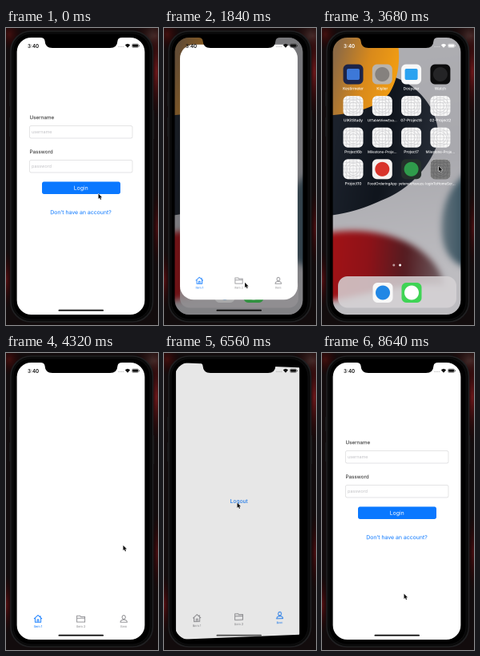
These frames come from a looping animation (190x372 px, 8720 ms). An HTML page with a canvas:

```html
<!DOCTYPE html>
<html lang="en">
<head>
<meta charset="utf-8">
<title>Login flow</title>
<style>
html, body { margin: 0; width: 100%; height: 100%; overflow: hidden; background: #000; }
canvas { display: block; width: 100vw; height: 100vh; }
</style>
</head>
<body>
<canvas id="stage"></canvas>
<script>
const W = 190, H = 372, LOOP = 8720;
const SCR = { x: 13.6, y: 12, w: 159.8, h: 347, r: 18 };
const CX = SCR.x + SCR.w / 2, CY = SCR.y + SCR.h / 2;
const ICON = { x: 135.5, y: 164.5, w: 25, h: 25, r: 6 };
const BLUE = '#0a78ff', FONT = 'Inter, Roboto, sans-serif';
const canvas = document.getElementById('stage');
const g = canvas.getContext('2d');
let pages, sx, sy;

const clamp = v => Math.max(0, Math.min(1, v));
const span = (t, a, b) => clamp((t - a) / (b - a));
const ease = p => p * p * (3 - 2 * p);
const easeOut = p => 1 - (1 - p) ** 3;
const mix = (a, b, p) => a + (b - a) * p;

function box(c, x, y, w, h, r, fill, stroke) {
  c.beginPath();
  c.roundRect(x, y, w, h, r);
  if (fill) { c.fillStyle = fill; c.fill(); }
  if (stroke) { c.strokeStyle = stroke; c.stroke(); }
}

function disc(c, x, y, r, fill) {
  c.beginPath();
  c.arc(x, y, r, 0, 7);
  c.fillStyle = fill;
  c.fill();
}

// Set large and scaled down, so small letters keep even spacing.
function label(c, str, x, y, size, color, align = 'left', weight = 400) {
  c.save();
  c.translate(x, y);
  c.scale(0.1, 0.1);
  c.font = `${weight} ${size * 10}px ${FONT}`;
  c.textAlign = align;
  c.textBaseline = 'alphabetic';
  c.fillStyle = color;
  c.fillText(str, 0, 0);
  c.restore();
}

function shape(c, d, fill, stroke) {
  const p = new Path2D(d);
  if (fill) { c.fillStyle = fill; c.fill(p); }
  if (stroke) { c.strokeStyle = stroke; c.stroke(p); }
}

function gradient(c, x1, y1, x2, y2, ...colors) {
  const f = c.createLinearGradient(x1, y1, x2, y2);
  colors.forEach((color, i) => f.addColorStop(i / (colors.length - 1), color));
  return f;
}

function blank(c) {
  c.fillStyle = '#fff';
  c.fillRect(0, 0, W, H);
}

function drawLogin(c) {
  blank(c);
  c.lineWidth = 0.6;
  [['Username', 114.3, 122.5], ['Password', 157.3, 165.5]].forEach(([name, base, top]) => {
    label(c, name, 29.5, base, 6.3, '#222');
    box(c, 29.5, top, 128.5, 15.5, 2, '#fff', '#d4d4d6');
    label(c, name.toLowerCase(), 32, top + 9.6, 5.4, '#c4c4c8');
  });
  box(c, 45, 192.5, 98, 15.5, 2.5, BLUE);
  label(c, 'Login', 93.7, 202.8, 6.9, '#fff', 'center');
  label(c, 'Don\u2019t have an account?', 93.5, 233.3, 6.9, BLUE, 'center');
}

function drawTabs(c, active) {
  blank(c);
  if (active === 2) label(c, 'Logout', 93.7, 188, 6.9, BLUE, 'center');
  c.lineWidth = 0.9;
  const marks = [
    'M-5 0L0-4.6L5 0M-3.6-1V4.2H3.6V-1M-1 4.2V1H1V4.2M3-4V-2',
    'M-5 4V-3.8H-1L0-2.6H5V4ZM-5-.8H5',
    'M-2.1-2A2.1 2.4 0 1 1 2.1-2A2.1 2.4 0 1 1-2.1-2M-4.2 4.2C-4 0 4 0 4.2 4.2Z'
  ];
  ['Item 1', 'Item 2', 'Item'].forEach((name, i) => {
    const x = 40 + 53.6 * i, color = i === active ? BLUE : '#8a8a8e';
    c.save();
    c.translate(x, 333);
    shape(c, marks[i], null, color);
    c.restore();
    label(c, name, x, 344, 3.9, color, 'center');
  });
}

function drawWallpaper(c) {
  c.fillStyle = gradient(c, 110, 12, 150, 300, '#aeaeb2', '#a9a9ae', '#bdbcc0');
  c.fillRect(0, 0, W, H);
  const night = gradient(c, 20, 130, 140, 150, '#1b212b', '#10151d', '#262c36');
  shape(c, 'M0 90L85 60C118 68 152 105 144 146C132 178 106 204 74 216C50 227 30 233 0 236Z', night);
  const sun = gradient(c, 14, 40, 97, 62, '#8d6a45', '#d98a1c', '#f5a012');
  shape(c, 'M0 0H90C99 25 99 58 84 82C70 98 45 108 0 110Z', sun);
  c.save();
  c.filter = 'blur(16px)';
  shape(c, 'M190 175C158 195 148 225 150 258C152 285 168 300 190 302Z',
    gradient(c, 148, 0, 176, 0, '#66767f', '#3c5563'));
  shape(c, 'M-20 264C30 246 85 254 118 275C140 290 150 306 152 322C100 316 50 338 -20 346Z',
    gradient(c, 14, 290, 148, 300, '#a01216', '#8d1218', '#541c21', '#6d5a5e'));
  c.restore();
}

function gridIcon(c, x, y, w, h) {
  box(c, x, y, w, h, w * 0.24, '#f7f7f7');
  c.save();
  c.clip();
  c.strokeStyle = '#c4c4c7';
  c.lineWidth = 0.4;
  c.beginPath();
  for (let i = 1; i < 6; i++) {
    c.moveTo(x + w * i / 6, y); c.lineTo(x + w * i / 6, y + h);
    c.moveTo(x, y + h * i / 6); c.lineTo(x + w, y + h * i / 6);
  }
  c.stroke();
  [0.18, 0.3, 0.42].forEach(k => {
    c.beginPath();
    c.ellipse(x + w / 2, y + h / 2, w * k, h * k, 0, 0, 7);
    c.stroke();
  });
  c.restore();
}

const APPS = [
  ['Kestirmeler', '#1c2448', '#3d78d8', 'square'], ['Kişiler', '#b9b3ac', '#85817e'],
  ['Dosyalar', '#f8f8f8', '#2ba2f0', 'square'], ['Watch', '#0c0c0d', '#242426'],
  ['UIKitStudy'], ['UITableViewExa…'], ['07-Project6'], ['02-Project2'],
  ['Project6b'], ['Milestone-Proje…'], ['Project7'], ['Milestone-Proje…'],
  ['Project10'], ['FoodOrderingApp', '#f6f2f0', '#d9342b'],
  ['yetenekHavuzu', '#25302b', '#2f9b4b'], ['loginToHomeScr…']
];

function tile(c, x, y, bg, mark, kind) {
  box(c, x - 12.5, y - 12.5, 25, 25, 6, bg);
  if (kind) box(c, x - 8, y - 7, 16, 14, 2, mark);
  else disc(c, x, y, 9, mark);
}

function drawHome(c) {
  drawWallpaper(c);
  APPS.forEach(([name, bg, mark, kind], i) => {
    const x = 39 + 36.3 * (i % 4), row = Math.floor(i / 4);
    const y = 58 + 39.6 * row;
    if (bg) tile(c, x, y, bg, mark, kind);
    else gridIcon(c, x - 12.5, y - 12.5, 25, 25);
    label(c, name, x, y + 19.6, name.length > 12 ? 4.3 : 4.7, '#fff', 'center', 500);
  });
  disc(c, 89.8, 297, 1.5, '#ffffff90');
  disc(c, 97.6, 297, 1.5, '#fff');
  box(c, 20, 311, 148, 39.5, 12, 'rgba(214,211,213,.85)');
  tile(c, 76, 331.5, '#f8f8f8', '#2287e5');
  tile(c, 112, 331.5, '#3fd455', '#fff');
}

function render(draw, arg) {
  const c = document.createElement('canvas');
  c.width = W * 4;
  c.height = H * 4;
  const p = c.getContext('2d');
  p.scale(4, 4);
  draw(p, arg);
  return c;
}

const show = page => g.drawImage(page, 0, 0, W, H);

// Turns a page about its vertical axis; the near edge stays on the glass.
function turn(page, angle, near) {
  const s = Math.sin(angle), co = Math.cos(angle), q = 0.0013, half = SCR.w / 2;
  const far = 1 + 2 * half * s * q, mid = 1 + half * s * q;
  const kl = near > 0 ? 1 / far : 1, kr = near > 0 ? 1 : 1 / far;
  const left = -half * co * kl, right = half * co * kr, tall = SCR.h / 2;
  g.save();
  g.beginPath();
  g.moveTo(CX + left, CY - tall * kl);
  g.lineTo(CX + right, CY - tall * kr);
  g.lineTo(CX + right, CY + tall * kr);
  g.lineTo(CX + left, CY + tall * kl);
  g.clip();
  const step = 1 / sx;
  const unproject = u => u * mid / (co + near * u * s * q);
  for (let px = Math.floor((CX + left) * sx); px < (CX + right) * sx; px++) {
    const u = px * step - CX, x = unproject(u), x2 = unproject(u + step);
    const k = 1 / (1 + s * q * (half - near * x));
    const top = 2;
    g.drawImage(page, (CX + x) * 4, (SCR.y - top) * 4, Math.max(1, (x2 - x) * 4), (SCR.h + 2 * top) * 4,
      CX + u, CY - (tall + top) * k, step, (SCR.h + 2 * top) * k);
  }
  g.restore();
  g.fillStyle = `rgba(0,0,0,${0.82 * angle / (Math.PI / 2)})`;
  g.fillRect(0, 0, W, H);
}

function flip(from, to, p) {
  const a = ease(p) * Math.PI;
  g.fillStyle = '#000';
  g.fillRect(0, 0, W, H);
  if (a < Math.PI / 2) turn(from, a, -1);
  else turn(to, Math.PI - a, 1);
}

function card(page, r, fade) {
  g.save();
  g.globalAlpha = 1 - fade * 0.9;
  box(g, r.x, r.y, r.w, r.h, r.r);
  g.clip();
  const k = r.w / SCR.w;
  g.translate(r.x, r.y);
  g.scale(k, Math.max(k, r.h / SCR.h));
  g.translate(-SCR.x, -SCR.y);
  show(page);
  g.restore();
  if (fade > 0) {
    g.save();
    g.globalAlpha = fade;
    gridIcon(g, r.x, r.y, r.w, r.h);
    g.restore();
  }
}

const blend = (a, b, p) => Object.fromEntries(Object.keys(a).map(k => [k, mix(a[k], b[k], p)]));

function veil(alpha) {
  g.fillStyle = `rgba(20,20,24,${alpha})`;
  g.fillRect(0, 0, W, H);
}

function drawScreen(t) {
  const { login, first, last, home } = pages;
  if (t < 400) show(login);
  else if (t < 900) flip(login, first, span(t, 400, 900));
  else if (t < 1700) show(first);
  else if (t < 2720) {
    const lifted = { x: 41, y: 50, w: 105, h: 229, r: 14 };
    const drag = ease(span(t, 1700, 2150)), close = easeOut(span(t, 2150, 2720));
    show(home);
    veil(0.35 * (1 - close));
    card(first, blend(blend(SCR, lifted, drag), ICON, close), span(close, 0.6, 0.97));
  } else if (t < 3760) {
    show(home);
    if (t > 3590) box(g, ICON.x, ICON.y, ICON.w, ICON.h, ICON.r, 'rgba(0,0,0,.5)');
  } else if (t < 4260) {
    const open = easeOut(span(t, 3760, 4260));
    show(home);
    veil(0.35 * open);
    card(first, blend(ICON, SCR, open), 1 - span(open, 0.03, 0.4));
  } else if (t < 5000) show(first);
  else if (t < 6488) show(last);
  else if (t < 6988) flip(last, login, span(t, 6488, 6988));
  else show(login);
}

function drawStatus(t) {
  const home = t > 1900 && t < 4080;
  const turning = (t > 480 && t < 820) || (t > 6560 && t < 6900);
  const color = home ? '#fff' : '#111';
  if (!turning) label(g, '3:40', 27, 24.5, 6.2, color, 'left', 600);
  for (let i = 0; i < 4; i++) disc(g, 140.8 + 2 * i, 23.3, 0.55, home ? '#ffffffa0' : '#999');
  shape(g, 'M148.8 21.2Q152 18.2 155.2 21.2L152 24.7Z', color);
  g.lineWidth = 0.4;
  box(g, 157.6, 20, 8, 4.4, 1.2, null, color);
  box(g, 158.2, 20.6, 6.8, 3.2, 0.7, color);
  box(g, 166.1, 21.4, 0.7, 1.6, 0.3, color);
  if (t < 2150 || t > 4080) {
    box(g, 65.5, 352.8, 56.5, 1.8, 0.9, turning && t < 6800 ? '#4a4a4a' : '#050505');
  }
}

function glow(x, y, rx, ry, color) {
  g.save();
  g.translate(x, y);
  g.scale(rx, ry);
  const f = g.createRadialGradient(0, 0, 0, 0, 0, 1);
  f.addColorStop(0, color);
  f.addColorStop(1, 'rgba(40,0,0,0)');
  disc(g, 0, 0, 1, f);
  g.restore();
}

function drawPhone() {
  g.fillStyle = '#120c0d';
  g.fillRect(0, 0, W, H);
  glow(186, 10, 26, 24, '#4a3432');
  glow(188, 55, 10, 60, '#70181b');
  glow(189, 250, 7, 50, '#4a0e11');
  glow(0, 315, 9, 38, '#5c1013');
  glow(4, 8, 16, 20, '#42100f');
  g.lineWidth = 1.6;
  box(g, 6, 4, 177.5, 364, 25, '#090909', '#202022');
  g.lineWidth = 0.6;
  box(g, 9, 7, 171, 358, 22, '#000', '#171718');
  box(g, 4.2, 80, 1.6, 18, 0.5, '#1c1c1d');
  box(g, 4.2, 112, 1.6, 24, 0.5, '#1c1c1d');
  box(g, 183.6, 103, 1.6, 36, 0.5, '#1c1c1d');
}

// Pointer stops: time, x, y
const PATH = [
  [0, 115.5, 207.5], [950, 115.5, 207.5], [1560, 97, 354], [1700, 97, 354],
  [2200, 118, 172], [2500, 121, 168], [2640, 122, 168], [3300, 146, 173],
  [3960, 146, 173], [4760, 147, 332], [5040, 147, 332], [5560, 87.5, 202.5],
  [5700, 87.5, 202.5], [6180, 91.5, 187.5], [7100, 91.5, 187.5],
  [7900, 102.5, 301.5], [LOOP, 102.5, 301.5]
];

function drawPointer(t) {
  const i = PATH.findIndex(p => p[0] > t), a = PATH[i - 1], b = PATH[i];
  const p = ease(span(t, a[0], b[0]));
  const arrow = 'M0 0V6.4L1.5 5.1L2.5 7.5L3.6 7L2.6 4.7H4.6Z';
  g.save();
  g.translate(mix(a[1], b[1], p), mix(a[2], b[2], p));
  g.lineWidth = 0.9;
  g.lineJoin = 'round';
  shape(g, arrow, null, '#fff');
  shape(g, arrow, '#111');
  g.restore();
}

function draw(t) {
  g.setTransform(sx, 0, 0, sy, 0, 0);
  g.imageSmoothingQuality = 'high';
  drawPhone();
  g.save();
  box(g, SCR.x, SCR.y, SCR.w, SCR.h, SCR.r);
  g.clip();
  drawScreen(t);
  drawStatus(t);
  shape(g, 'M43 11V12Q48 12 48.5 16Q49 25 58 25H130Q139 25 139.5 16Q140 12 145 12V11Z', '#000');
  g.restore();
  drawPointer(t);
}

function resize() {
  const d = window.devicePixelRatio || 1;
  canvas.width = Math.round(innerWidth * d);
  canvas.height = Math.round(innerHeight * d);
  sx = canvas.width / W;
  sy = canvas.height / H;
}

pages = {
  login: render(drawLogin),
  first: render(drawTabs, 0),
  last: render(drawTabs, 2),
  home: render(drawHome)
};
resize();
addEventListener('resize', resize);
const start = performance.now();
function tick() {
  draw((performance.now() - start) % LOOP);
  requestAnimationFrame(tick);
}
tick();
</script>
</body>
</html>
```
